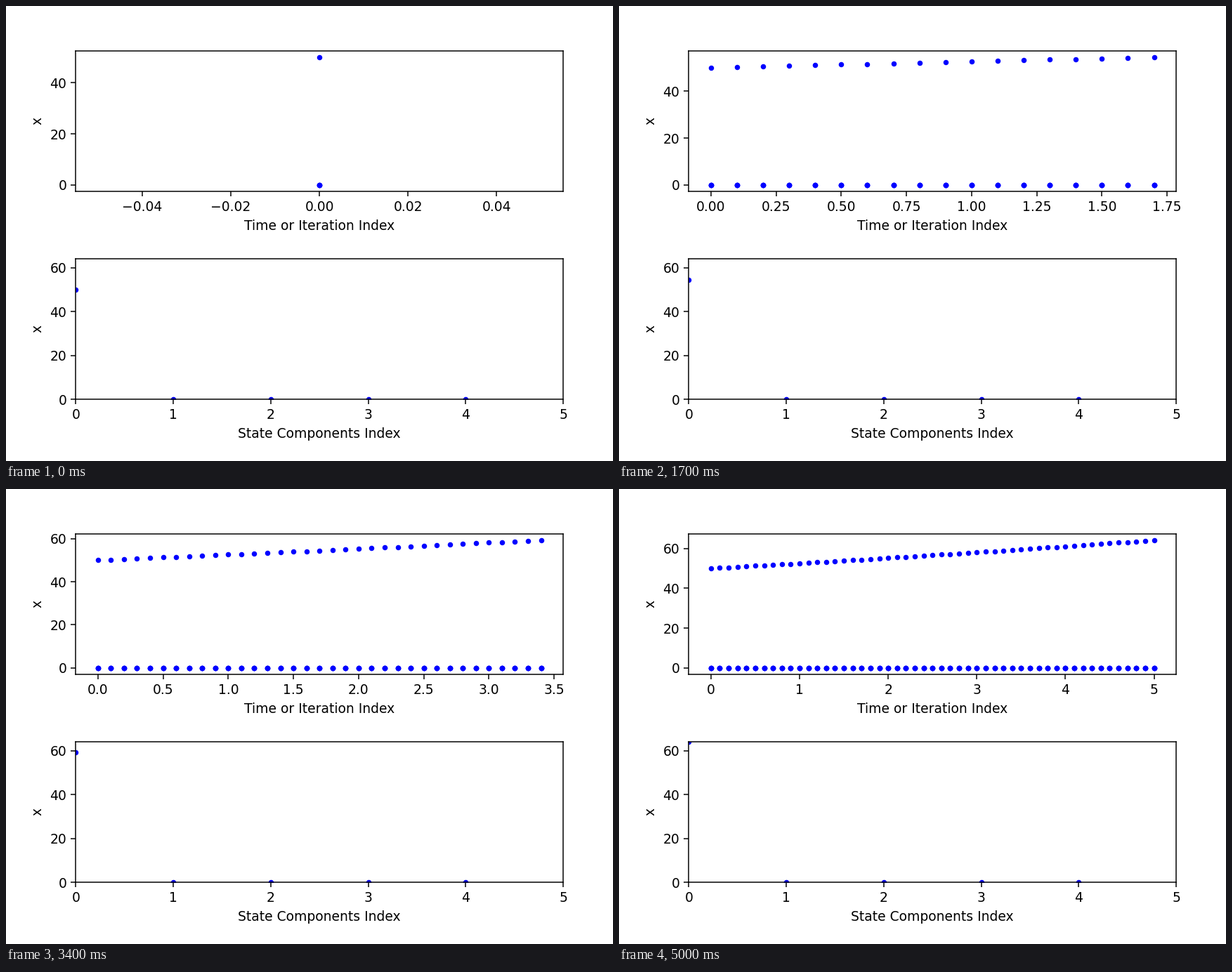
A matplotlib script for the animation above (5.1 s loop, 864 by 648 pixels).

```python
import numpy as np
import matplotlib.pyplot as plt
from matplotlib.animation import FuncAnimation

W, H, DPI = 864, 648, 135
STEPS, DT, SIZE = 51, 0.1, 5
GROWTH = 1.005

times = np.arange(STEPS) * DT
states = np.zeros((STEPS, SIZE))
states[:, 0] = 50 * GROWTH ** np.arange(STEPS)

fig = plt.figure(figsize=(W / DPI, H / DPI), dpi=DPI, facecolor="white")


def add_panel(top, bottom, xlabel):
    """Axes between two pixel rows measured from the top of the stage."""
    left, right = 99.3, 793.1
    ax = fig.add_axes([left / W, 1 - bottom / H, (right - left) / W, (bottom - top) / H])
    ax.set_xlabel(xlabel)
    ax.set_ylabel("x")
    return ax


history = add_panel(63.8, 264, "Time or Iteration Index")
current = add_panel(359.8, 560, "State Components Index")
current.set_xlim(0, SIZE)
current.set_ylim(0, states.max())

tracks = [history.plot([], [], "b.")[0] for _ in range(SIZE)]
dots, = current.plot([], [], "b.")


def update(i):
    for k, track in enumerate(tracks):
        track.set_data(times[:i + 1], states[:i + 1, k])
    history.relim()
    history.autoscale_view()
    dots.set_data(np.arange(SIZE), states[i])
    return [*tracks, dots]


anim = FuncAnimation(fig, update, frames=STEPS, init_func=lambda: update(0),
                     interval=100, repeat=True, repeat_delay=0, blit=False)
plt.show()
```
